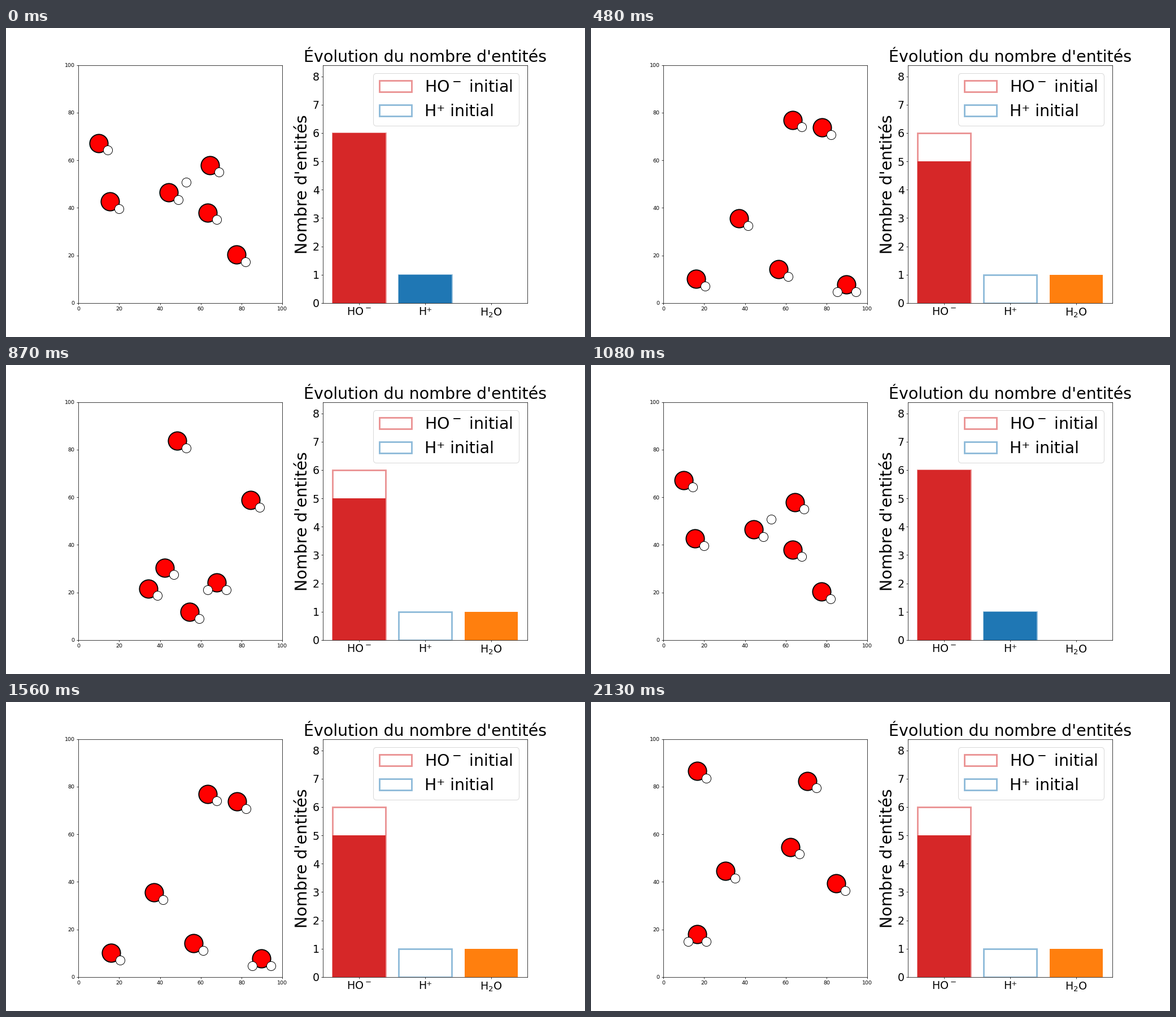
These frames come from a looping animation (1025 px wide and 547 px high, 2.16 s). A matplotlib script:

```python
import numpy as np
import matplotlib.pyplot as plt
from matplotlib.animation import FuncAnimation

W, H, DPI = 1025, 547, 205 / 3
CYCLE, FRAMES, STEP = 36, 72, 30
REACTION = 3                      # step at which H+ joins a hydroxide
H_SHIFT = np.array([4.5, -3.0])   # hydrogen relative to its oxygen

# Positions of each oxygen at the main collision times
TIMES = [0, 7, 16, 24, 29, 35]
TRACKS = [
    [(9.9, 67.2), (12.7, 52.8), (37, 35.5), (17.3, 81), (48.5, 83.8), (16.5, 86.6)],
    [(15.4, 42.7), (33.7, 24.7), (15.9, 10.2), (25.6, 43.9), (34.2, 21.6), (30.5, 44.5)],
    [(44.4, 46.4), (33.4, 44.9), (63.3, 77), (38.1, 84.8), (42.4, 30.4), (62.3, 54.6)],
    [(63.3, 38), (50.6, 38.8), (56.6, 14.1), (53.9, 66.7), (54.6, 11.9), (84.6, 39.3)],
    [(77.4, 20.4), (89.9, 34.1), (77.7, 73.7), (79.2, 65.9), (84.3, 58.8), (70.5, 82.4)],
    [(64.4, 58), (84.9, 55.9), (89.8, 7.8), (80.9, 21.6), (67.9, 24.2), (16.6, 17.9)],
]
WATER = 5
# Extra wall hits: track -> (time, x, y)
WALL_HITS = {
    0: [(26.8, 34.8, 93), (33.9, 7, 87)],
    4: [(20, 93, 71), (27, 93, 62)],
    WATER: [(25.7, 93, 22.4)],
}


def build_path(i):
    points = [(t, x, y) for t, (x, y) in zip(TIMES, TRACKS[i])]
    return np.array(sorted(points + WALL_HITS.get(i, []))).T


def locate(path, t):
    return np.array([np.interp(t, path[0], path[1]), np.interp(t, path[0], path[2])])


paths = [build_path(i) for i in range(len(TRACKS))]
proton_start = np.array([52.9, 50.7])
proton_end = locate(paths[WATER], REACTION) + H_SHIFT * (-1, 1)

fig, (box, chart) = plt.subplots(
    1, 2, figsize=((W + 0.001) / DPI, (H + 0.001) / DPI), dpi=DPI)

# Particle box
box.set(xlim=(0, 100), ylim=(0, 100))
oxygens, = box.plot([], [], "o", ms=34, mfc="red", mec="black", mew=2)
hydrogens, = box.plot([], [], "o", ms=17, mfc="white", mec="black", mew=1)

# Bar chart
for x, (count, color, name) in enumerate([(6, "tab:red", "HO$^-$"), (1, "tab:blue", "H⁺")]):
    chart.bar(x, count, fill=False, edgecolor=color, lw=3, alpha=0.5,
              label=name + " initial")
bars = chart.bar(range(3), [6, 1, 0], color=["tab:red", "tab:blue", "tab:orange"])
chart.set(xlim=(-0.54, 2.54), ylim=(0, 8.4), yticks=range(9))
chart.set_xticks(range(3), ["HO$^-$", "H⁺", "H$_2$O"])
chart.tick_params(labelsize=20)
chart.set_title("Évolution du nombre d'entités", fontsize=30)
chart.set_ylabel("Nombre d'entités", fontsize=30)
chart.legend(fontsize=30, loc="upper right")


def update(frame):
    t = frame % CYCLE
    reacted = t >= REACTION
    centers = np.array([locate(p, t) for p in paths])
    if reacted:
        extra = centers[WATER] + H_SHIFT * (-1, 1)
    else:
        extra = proton_start + (proton_end - proton_start) * t / REACTION
    oxygens.set_data(*centers.T)
    hydrogens.set_data(*np.vstack([centers + H_SHIFT, extra]).T)
    for bar, count in zip(bars, (5, 0, 1) if reacted else (6, 1, 0)):
        bar.set_height(count)
    return [oxygens, hydrogens, *bars]


anim = FuncAnimation(fig, update, frames=FRAMES, interval=STEP,
                     repeat=True, repeat_delay=0, blit=False)
plt.show()
```
